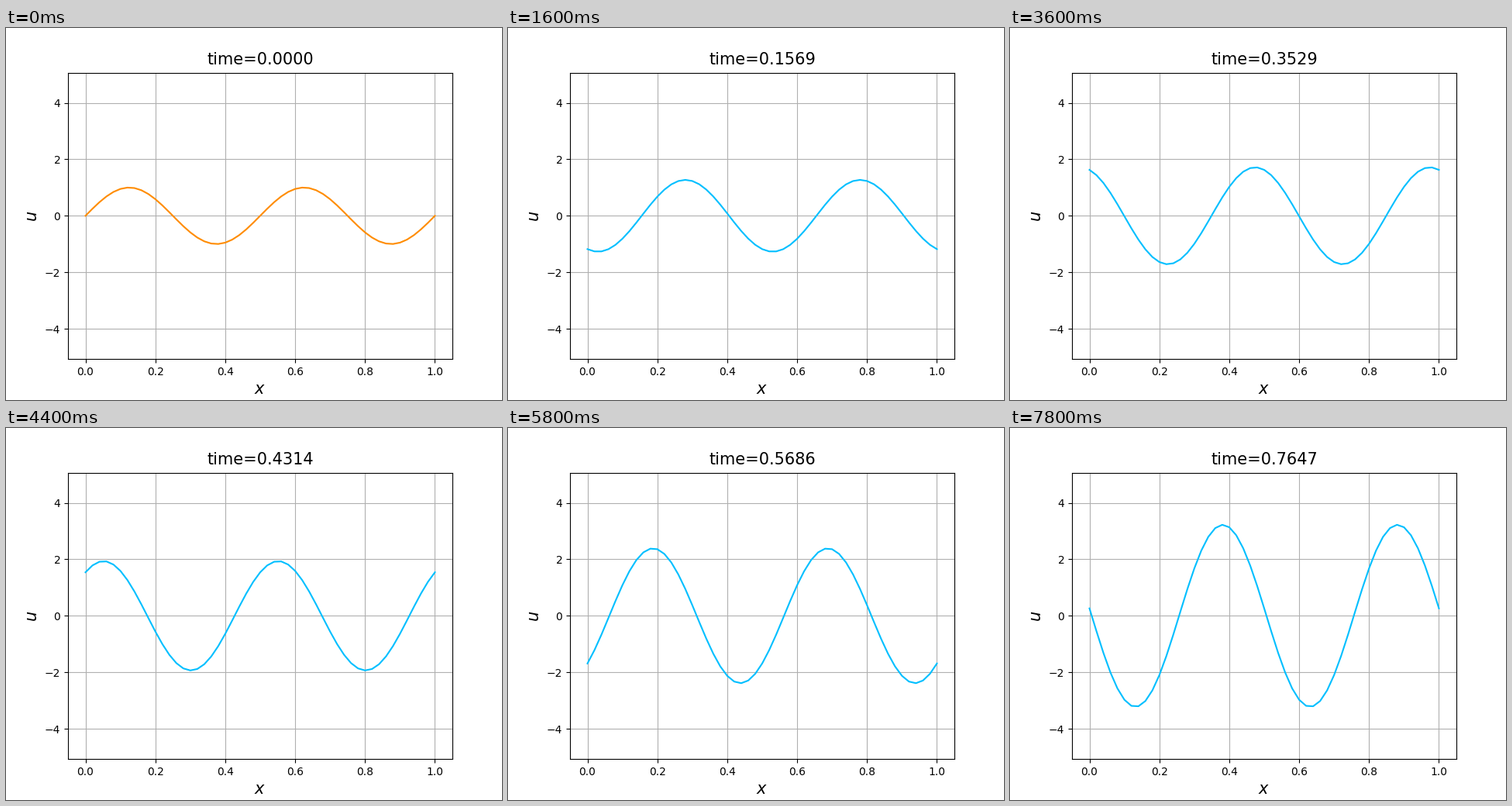
A matplotlib script that plays this animation: 640x480 px, repeating every 8000 ms.

```python
import numpy as np
import matplotlib.pyplot as plt
from matplotlib.animation import FuncAnimation

FRAMES = 40
INTERVAL = 200
DT = 1 / 51
K = 4 * np.pi

# Explicit central-difference advection at Courant number 1:
# every step turns the sine wave's phase and amplifies it.
x = np.linspace(0, 1, 51)
s = np.sin(K * (x[1] - x[0]))
gain = np.hypot(1, s)
turn = np.arctan(s)


def wave(n):
    return gain**n * np.sin(K * x - n * turn)


fig, ax = plt.subplots(figsize=(6.4, 4.8), dpi=100)
last = wave(51)
margin = 0.05 * np.ptp(last)
ax.set_xlim(-0.05, 1.05)
ax.set_ylim(last.min() - margin, last.max() + margin)
ax.set_xlabel("$x$", fontsize=15)
ax.set_ylabel("$u$", fontsize=15)
ax.grid(True)

line, = ax.plot(x, wave(0), color="darkorange", lw=1.5)
label = ax.text(0.5, 1.03, "time=0.0000", transform=ax.transAxes,
                ha="center", fontsize=15)


def update(n):
    line.set_ydata(wave(n))
    line.set_color("deepskyblue" if n else "darkorange")
    label.set_text(f"time={n * DT:.4f}")
    return line, label


anim = FuncAnimation(fig, update, frames=FRAMES, interval=INTERVAL,
                     init_func=lambda: update(0), repeat=True, repeat_delay=0)
plt.show()
```
